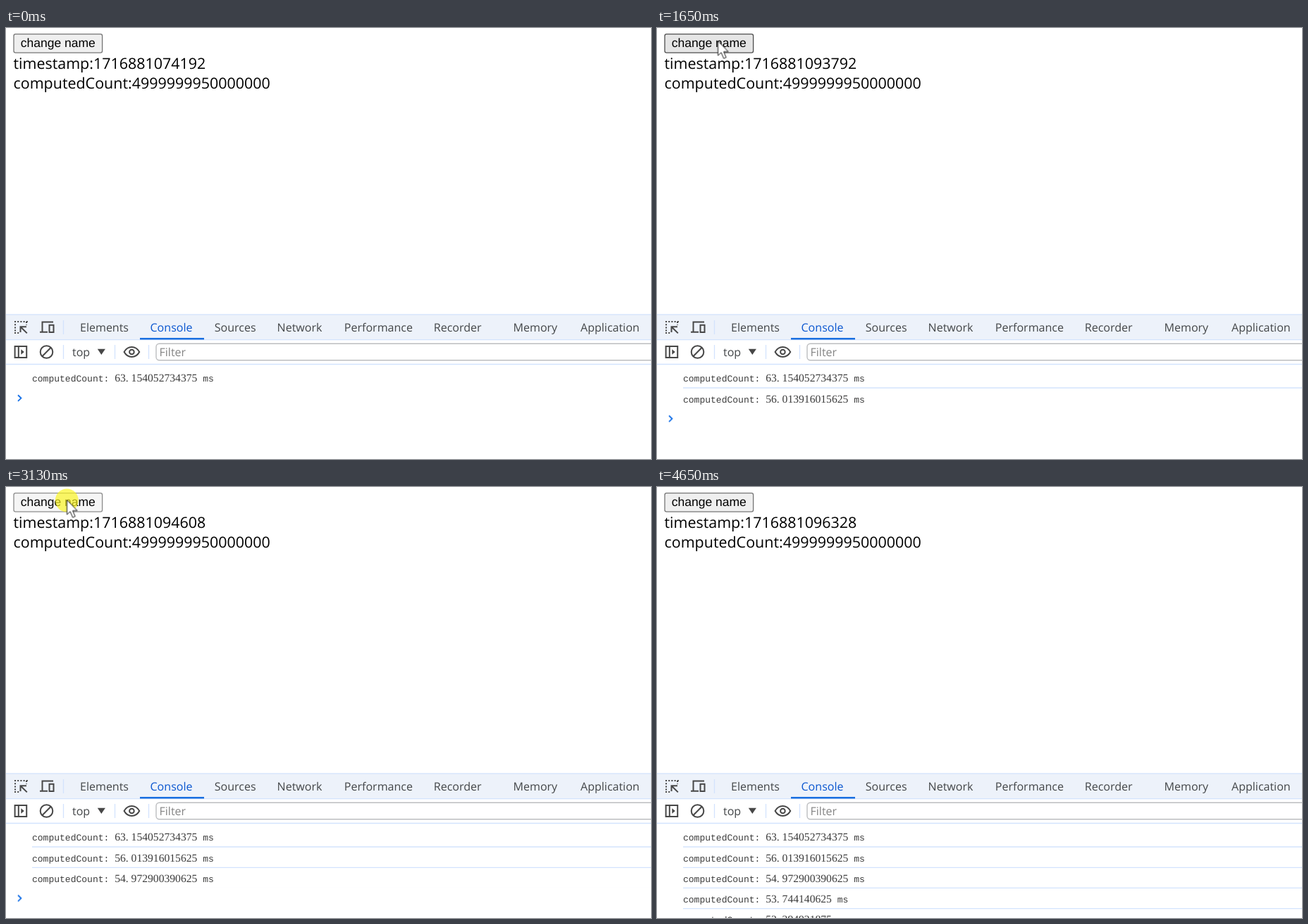
These frames come from a looping animation (915x612 px, 5120 ms). An HTML page:

```html
<!DOCTYPE html>
<html lang="en">
<head>
<meta charset="utf-8">
<title>Computed count</title>
<style>
  html, body { margin: 0; width: 100%; height: 100%; overflow: hidden; background: #fff; }
  svg { display: block; }
  text { white-space: pre; text-rendering: geometricPrecision; }
  .page { font: 21.45px "Open Sans", "Noto Sans", sans-serif; fill: #000; }
  .label { font: 17.5px "Liberation Sans", Arial, sans-serif; fill: #000; }
  .ui { font: 16.05px "Open Sans", "Noto Sans", sans-serif; fill: #444749; }
  .log { font: 13.03px "Liberation Mono", monospace; fill: #3c3c3c; }
  .num { font: 15.64px "Liberation Serif", serif; }
  .icon { fill: none; stroke: #474747; stroke-width: 2; }
  .rule { fill: none; stroke: #d3e3fd; stroke-width: 1.3; }

  #button, #halo, #cursor, #reel, #prompt { animation: 5120ms step-end infinite; }
  #button { animation-name: button; fill: #efefef; stroke: #767676; stroke-width: 1.3; }
  #halo { animation-name: halo; }
  #cursor { animation-name: cursor; }
  #reel { animation-name: reel; }
  #prompt { animation-name: prompt; }

  /* idle, hovered, pressed */
  @keyframes button {
    0%, 87.01% { fill: #efefef; stroke: #767676; }
    7.6%, 31.44%, 47.07%, 64.84%, 81.64% { fill: #e5e5e5; stroke: #4f4f4f; }
    28.32%, 43.94%, 61.13%, 77.73% { fill: #f5f5f5; stroke: #8d8d8d; }
  }
  @keyframes halo {
    0%, 30.85%, 46.48%, 63.67%, 80.46% { opacity: 0; }
    28.32%, 43.94%, 61.13%, 77.73% { opacity: 1; }
  }
  @keyframes cursor {
    0%, 90.82%, 100% { transform: translate(930px, 630px); }
    1.36% { transform: translate(812px, 588px); }
    2.61% { transform: translate(640px, 440px); }
    3.86% { transform: translate(450px, 290px); }
    5.11% { transform: translate(290px, 170px); }
    6.34% { transform: translate(180px, 85px); }
    7.6% { transform: translate(120px, 30px); }
    8.85% { transform: translate(96px, 4px); }
    10.1% { transform: translate(90px, 14px); }
    11.32% { transform: translate(88px, 19px); }
    14.06% { transform: translate(87.5px, 18.5px); }
    28.32% { transform: translate(86.5px, 18.5px); }
    85.74% { transform: translate(110px, 30px); }
    87.01% { transform: translate(250px, 160px); }
    88.28% { transform: translate(460px, 360px); }
    89.55% { transform: translate(680px, 588px); }
  }
  @keyframes reel {
    0% { transform: translateY(0); }
    31.44% { transform: translateY(-30px); }
    47.07% { transform: translateY(-60px); }
    64.84% { transform: translateY(-90px); }
    81.64%, 100% { transform: translateY(-120px); }
  }
  @keyframes prompt {
    0% { transform: translateY(0); }
    32.22% { transform: translateY(29.2px); }
    47.65% { transform: translateY(58.4px); }
    64.84% { transform: translateY(87.6px); }
    81.64%, 100% { transform: translateY(116.8px); }
  }
</style>
</head>
<body>
<svg width="915" height="612" viewBox="0 0 915 612">
  <rect width="915" height="612" fill="#fff"/>

  <!-- page -->
  <rect id="button" x="11" y="8.6" width="125.6" height="26.6" rx="2.6"/>
  <text class="label" x="20.8" y="27.3">change name</text>
  <svg x="0" y="36" width="500" height="30" overflow="hidden">
    <g id="reel" class="page">
      <text x="10.5" y="22">timestamp:1716881074192</text>
      <text x="10.5" y="52">timestamp:1716881093792</text>
      <text x="10.5" y="82">timestamp:1716881094608</text>
      <text x="10.5" y="112">timestamp:1716881095441</text>
      <text x="10.5" y="142">timestamp:1716881096328</text>
    </g>
  </svg>
  <text class="page" x="10.5" y="85.5">computedCount:4999999950000000</text>

  <!-- console log, uncovered row by row -->
  <g class="log">
    <text x="37" y="502.3">computedCount: <tspan class="num">63.<tspan dx="3.9">154052734375</tspan></tspan> ms</text>
    <text x="37" y="531.7">computedCount: <tspan class="num">56.<tspan dx="3.9">013916015625</tspan></tspan> ms</text>
    <text x="37" y="561">computedCount: <tspan class="num">54.<tspan dx="3.9">972900390625</tspan></tspan> ms</text>
    <text x="37" y="590">computedCount: <tspan class="num">53.<tspan dx="3.9">744140625</tspan></tspan> ms</text>
    <text x="37" y="619">computedCount: <tspan class="num">52.<tspan dx="3.9">294921875</tspan></tspan> ms</text>
  </g>
  <path class="rule" d="M37 511H915M37 540.3H915M37 569.4H915M37 598.6H915"/>
  <g id="prompt">
    <rect y="509.5" width="915" height="140" fill="#fff"/>
    <path d="M17 521.3L21.4 525.6L17 529.9" fill="none" stroke="#1a73e8" stroke-width="1.9"/>
  </g>

  <!-- tab bar -->
  <rect y="407" width="915" height="35.5" fill="#edf2fa"/>
  <path class="rule" d="M0 406.8H915M0 442.6H915M0 477.5H915M81.5 415V435M81.5 450V470M154.5 450V470M202.5 450V470"/>
  <rect x="190" y="440" width="91" height="2.5" fill="#1a6fe0"/>
  <g class="ui">
    <text x="105" y="430.5">Elements</text>
    <text x="204.5" y="430.5" style="fill:#0b57d0">Console</text>
    <text x="295.8" y="430.5">Sources</text>
    <text x="384.6" y="430.5">Network</text>
    <text x="479.8" y="430.5">Performance</text>
    <text x="606.8" y="430.5">Recorder</text>
    <text x="719.5" y="430.5">Memory</text>
    <text x="815" y="430.5">Application</text>
    <text x="94" y="466">top</text>
  </g>

  <!-- inspect and device icons -->
  <g class="icon">
    <path d="M12 417H31M12 433H20M29 417V422" stroke-dasharray="2 2.2"/>
    <path d="M13 420.2V432" stroke-dasharray="2 2.2"/>
    <path d="M20.5 432V424.3H29M21 424.8L29.8 433.4"/>
    <path d="M51.5 431V417.5H67M48 431.7H59"/>
    <rect x="61.5" y="421.8" width="6" height="10.2"/>
  </g>

  <!-- console toolbar -->
  <g class="icon">
    <rect x="12.6" y="452" width="16.6" height="16"/>
    <path d="M17.8 452V468"/>
    <path d="M21.3 456.2L25.8 460L21.3 463.8Z" fill="#474747" stroke="none"/>
    <circle cx="57.5" cy="460" r="8.8"/>
    <path d="M51.3 466.2L63.7 453.8"/>
    <path d="M129.8 455.8H140.9L135.3 464Z" fill="#474747" stroke="none"/>
    <path d="M167.6 460Q171.4 453 178.4 453T189.2 460Q185.4 467 178.4 467T167.6 460Z"/>
    <circle cx="178.4" cy="460" r="3.3"/>
  </g>
  <rect x="213" y="448.2" width="720" height="23.6" rx="4.5" fill="#fff" stroke="#bcbec0" stroke-width="1.4"/>
  <text class="ui" x="217.5" y="466" style="fill:#858585">Filter</text>

  <!-- pointer -->
  <circle id="halo" cx="86.3" cy="19" r="16.5" fill="#fbf520" fill-opacity=".68"/>
  <path id="cursor" d="M0 0V20.6L4.6 16.4L8.2 24.8L11.6 23.3L8.1 15.1H14.6Z" fill="#fff" stroke="#111" stroke-width="1"/>
</svg>
</body>
</html>
```
